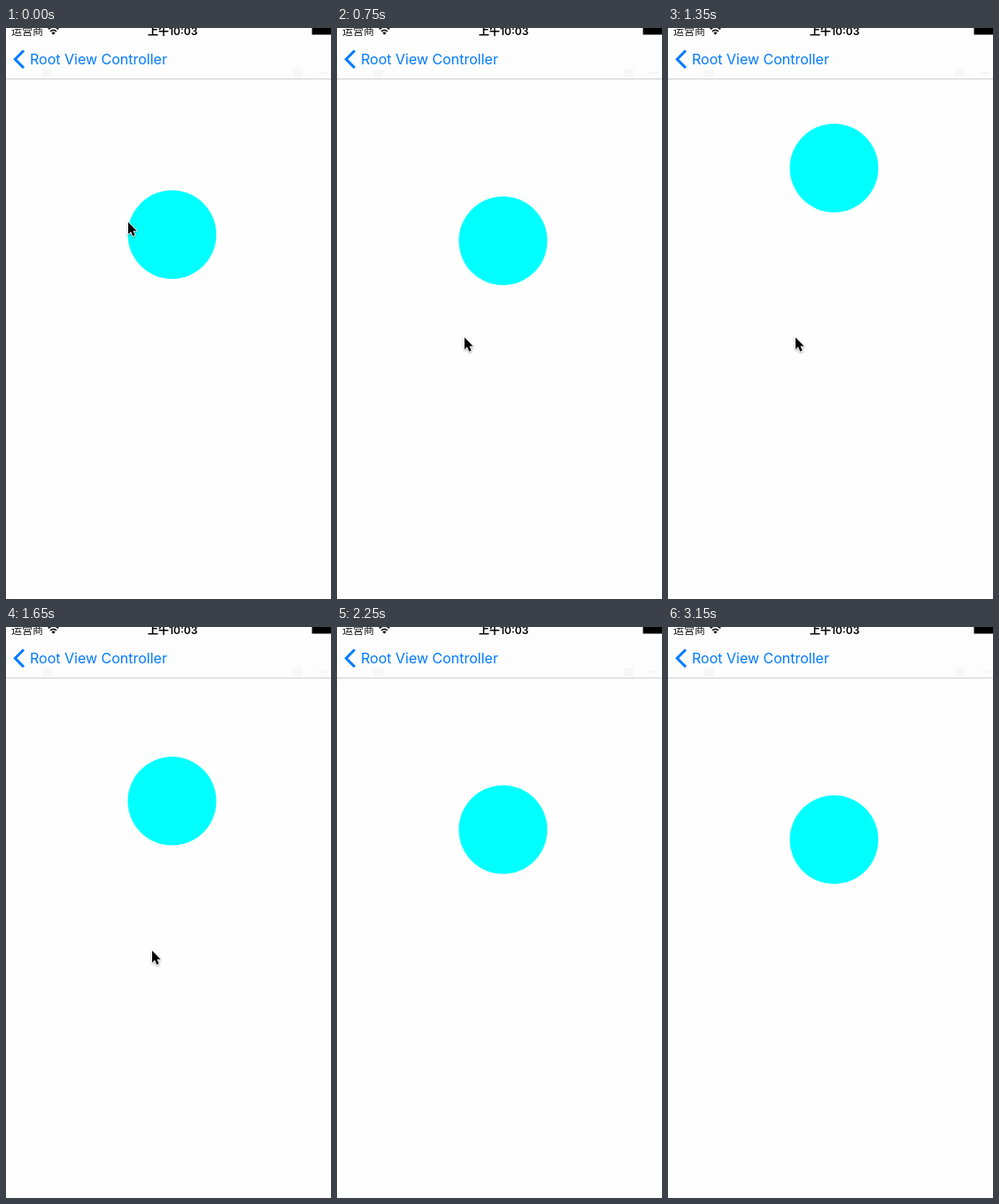
An HTML page for the animation above (4.08 s loop, 367 by 644 pixels).

```html
<!DOCTYPE html>
<html lang="en">
<head>
<meta charset="utf-8">
<title>Bouncing circle</title>
<style>
  html, body { margin: 0; width: 100%; height: 100%; overflow: hidden; background: #fefefe; }
  svg { display: block; width: 367px; height: 644px; }
  text { white-space: pre; }
  .status { font: 12px "Noto Sans CJK SC", "Noto Sans CJK", sans-serif; fill: #111; }
  .clock { font: 600 12px Inter, "Noto Sans CJK SC", "Noto Sans CJK", sans-serif; fill: #000; }
  .back { font: 16px Inter, sans-serif; fill: #007aff; }
  #cursor { filter: drop-shadow(0 1px 1px rgba(0, 0, 0, .35)); }
</style>
</head>
<body>
<svg viewBox="0 0 367 644">
  <rect width="367" height="57" fill="#fdfdfd"/>
  <path d="M41 47h11v9H41zM324 46h11v10h-11zM353 49h10v3h-10z" fill="#f7f7f7"/>
  <rect y="57" width="367" height="1" fill="#cfcfcf"/>

  <text class="status" x="6" y="8">运营商</text>
  <g fill="none" stroke="#111" stroke-width="1.7">
    <path d="M47.8 1.4Q53.5 -3.6 59.2 1.4M50 3.8Q53.5 .8 57 3.8"/>
    <path d="M51.3 5.3Q53.5 3.6 55.7 5.3L53.5 7.7Z" fill="#111" stroke="none"/>
  </g>
  <text class="clock" x="160" y="7.5">上午10:03</text>
  <rect x="345.5" width="21.5" height="7.5"/>

  <path d="M20 25.5L10.3 35.2L20 45" fill="none" stroke="#007aff" stroke-width="3"/>
  <text class="back" x="27" y="41">Root View Controller</text>

  <circle id="ball" cx="187.5" cy="233" r="50" fill="#0ff"/>
  <path id="cursor" d="M0 0V13.4L3 10.6L5.2 15.8L7.7 14.8L5.5 9.7H9.6Z"
        stroke="#fff" stroke-width="1.6" paint-order="stroke" stroke-linejoin="round"/>
</svg>
<script>
  const LOOP = 4080, STEP = 150, RADIUS = 50;
  const REST = 192, DECAY = 0.737;
  const ball = document.getElementById('ball');
  const cursor = document.getElementById('cursor');

  // [step, x, y] of the pointer tip, held until the next entry
  const path = [
    [0, 138, 219], [1, 138, 220], [2, 138, 225], [3, 137, 246],
    [4, 135, 283], [5, 144, 349], [11, 165, 365], [12, 271, 507]
  ];
  const CURSOR_GONE = 13;

  const settle = (gap, n) => REST - gap * DECAY ** n;

  function ballTop(step) {
    if (step < 5) return settle(9, step);
    if (step < 8) return 190;
    return Math.min(190, settle(114, step - 8));
  }

  function draw(now) {
    const step = Math.min(21, Math.floor((now % LOOP) / STEP));
    ball.setAttribute('cy', ballTop(step) + RADIUS);
    const [, x, y] = path.filter(p => p[0] <= step).pop();
    cursor.setAttribute('transform', `translate(${x} ${y})`);
    cursor.setAttribute('visibility', step < CURSOR_GONE ? 'visible' : 'hidden');
  }

  const start = performance.now();
  function tick() {
    draw(performance.now() - start);
    requestAnimationFrame(tick);
  }
  tick();
</script>
</body>
</html>
```
